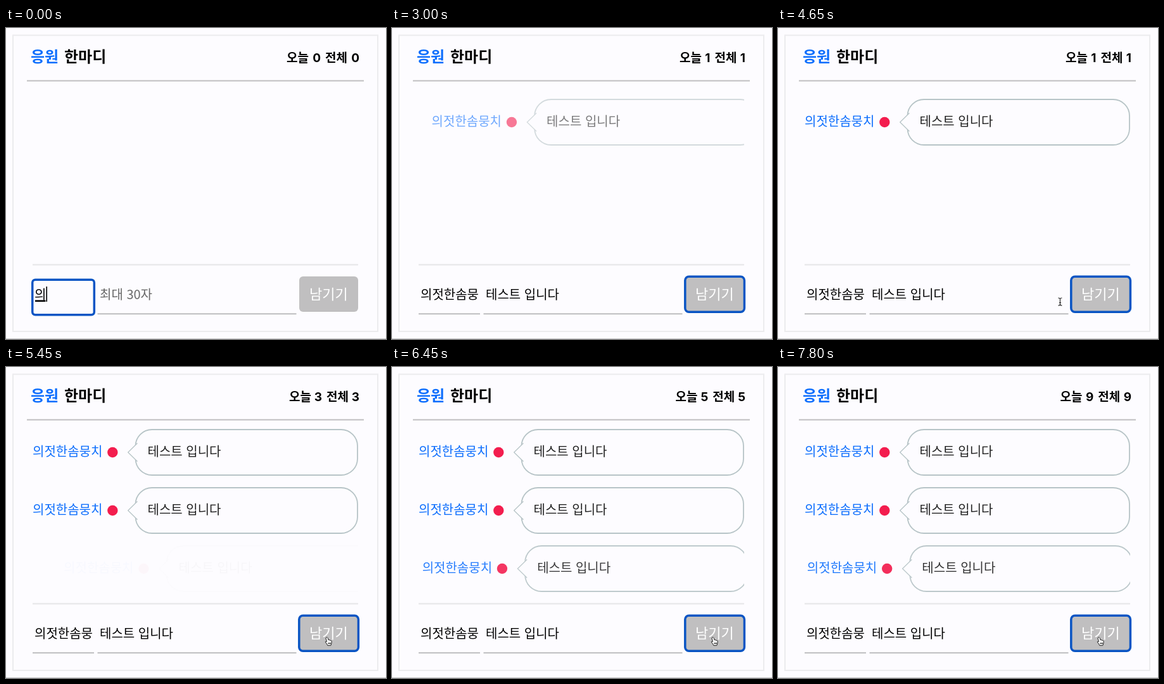
An HTML page for the animation above (7850 ms loop, 600 by 492 pixels).

```html
<!DOCTYPE html>
<html lang="ko">
<head>
<meta charset="utf-8">
<title>응원 한마디</title>
<style>
  html, body { margin: 0; width: 100%; height: 100%; overflow: hidden; background: #fdfcff; }
  svg { display: block; width: 600px; height: 492px; }
  text { font: 400 20px "Noto Sans CJK KR", "Noto Sans KR", "Noto Sans CJK", sans-serif; white-space: pre; }
  .title { font-size: 24px; font-weight: 700; }
  .count { font-size: 19px; font-weight: 700; }
  .digit { font: 700 19px Inter, sans-serif; text-anchor: end; }
  .label { font-size: 22px; fill: #fff; }
  .line { stroke-width: 2; fill: none; }
  .ring { fill: none; stroke: #0a55c4; stroke-width: 3.5; }
</style>
</head>
<body>
<svg viewBox="0 0 600 492">
  <defs>
    <clipPath id="listClip"><rect x="42" y="85" width="514" height="289"/></clipPath>
    <clipPath id="nameClip"><rect x="45" y="400" width="92" height="50"/></clipPath>
    <g id="row">
      <text x="42" y="43" fill="#0d6efd">의젓한솜뭉치</text>
      <circle cx="168.3" cy="37" r="8.2" fill="#f31d4e"/>
      <rect x="204.5" y="1" width="350.5" height="72" rx="26" fill="#fdfcff" stroke="#b7c4c7" stroke-width="1.8"/>
      <path d="M207.5 22.5L192.7 37L207.5 51.5" fill="#fdfcff" stroke="#b7c4c7" stroke-width="1.3"/>
      <text x="223.5" y="43" fill="#222">테스트 입니다</text>
    </g>
  </defs>
  <rect width="600" height="492" fill="#fdfcff"/>
  <rect class="line" x="11" y="11.5" width="576" height="468.5" stroke="#ececee"/>
  <path class="line" d="M0 491.5H600" stroke="#c9c8cb" style="stroke-width:1"/>
  <path class="line" d="M33 83.5H565" stroke="#bfbfc0"/>
  <path class="line" d="M42 374.5H556" stroke="#e6e6e8"/>
  <text class="title" x="39" y="54" fill="#0d6efd">응원</text>
  <text class="title" x="92" y="54">한마디</text>
  <text class="count" id="today" y="54">오늘</text>
  <text class="digit" id="todayNum" y="54"></text>
  <text class="count" id="total" y="54">전체</text>
  <text class="digit" id="totalNum" x="558" y="54"></text>

  <g id="list" clip-path="url(#listClip)"></g>

  <path class="line" id="nameLine" d="M42 452.3H139" stroke="#bdbdbf"/>
  <path class="line" id="msgLine" d="M144.5 452.3H458.5" stroke="#bdbdbf"/>
  <text id="hint" x="148" y="428.5" fill="#686868">최대 30자</text>
  <g clip-path="url(#nameClip)"><text id="name" y="428.5"></text></g>
  <text id="msg" x="148" y="428.5"></text>
  <rect id="compose" y="430.5" height="2.6"/>
  <rect id="caret" y="409" width="1.6" height="24"/>
  <rect x="463" y="393" width="93" height="56" rx="6" fill="#c0bfc0"/>
  <text class="label" x="479" y="428.5">남기기</text>
  <rect class="ring" id="nameRing" x="41.7" y="398.2" width="97.6" height="55.6" rx="4.5"/>
  <rect class="ring" id="msgRing" x="144.2" y="397.2" width="314.6" height="56.2" rx="4.5"/>
  <rect class="ring" id="btnRing" x="462.8" y="393.2" width="93.6" height="56" rx="6"/>

  <g id="arrow" fill="#111" stroke="#fff" stroke-width="1"><path d="M0 0V14L3.3 11L5.5 16L7.8 15L5.6 10.2H10Z"/></g>
  <path id="beam" d="M-3 -6Q0 -6 0 -4Q0 -6 3 -6M0 -4V4M-3 6Q0 6 0 4Q0 6 3 6M-1.5 1.5H1.5" fill="none" stroke="#222" stroke-width="1.1"/>
  <path id="hand" d="M-3 -6.3Q-1.7 -7 -1 -5.5L0 -2.2Q1.2 -3 2 -1.8Q3.2 -2.4 3.8 -1.1Q5.3 -1.5 5.2 .4L4.8 3.5L3.8 6.6H-1.2L-2.5 4L-4.8 .9Q-4.3 -.7 -2.5 .5L-4 -5Q-4 -6 -3 -6.3ZM0 2V4.5M1.7 2V4.5M3.3 2V4.5" fill="#fff" stroke="#222" stroke-width="1"/>
</svg>
<script>
const LOOP = 7850, NAME_END = 1300, SUBMIT_FOCUS = 2700;
const POSTS = [2865, 5050, 5438, 5830, 6210, 6540, 6870, 7200, 7536];
const SLIDE = 400, SHIFT = 50, PITCH = 92;
const NAME_KEYS = '의,읮,의저,의젓,의젓ㅎ,의젓하,의젓한,의젓한ㅅ,의젓한소,의젓한솜,의젓한솜ㅁ,의젓한솜무,의젓한솜뭉,의젓한솜뭉ㅊ,의젓한솜뭉치'.split(',');
const MSG_KEYS = ',ㅌ,테,텟,테스,테슽,테스트,테스트 ,테스트 ㅇ,테스트 이,테스트 입,테스트 입ㄴ,테스트 입니,테스트 입닏,테스트 입니다'.split(',');
const DIGIT_W = [12, 6.5, 10.2, 10, 10.8, 9.7, 10.6, 9.4, 10.4, 10.7];
// time, x, y
const PATH = [[4400, -4, 330], [4500, 150, 372], [4650, 445, 433], [4800, 509, 434]];

const $ = id => document.getElementById(id);
const show = (id, on) => $(id).setAttribute('visibility', on ? 'visible' : 'hidden');
const attr = (id, key, val) => $(id).setAttribute(key, val);
const clamp = (v, lo, hi) => Math.min(hi, Math.max(lo, v));
const typed = (keys, t, start, step) => keys[clamp(Math.floor((t - start) / step), 0, keys.length - 1)];

// The CSS "ease" curve, solved by bisection.
function ease(p) {
  if (p <= 0 || p >= 1) return clamp(p, 0, 1);
  const curve = (s, a, b) => 3 * (1 - s) ** 2 * s * a + 3 * (1 - s) * s * s * b + s ** 3;
  let lo = 0, hi = 1;
  for (let i = 0; i < 20; i++) {
    const mid = (lo + hi) / 2;
    if (curve(mid, .25, .25) < p) lo = mid; else hi = mid;
  }
  return curve(lo, .1, 1);
}

const rows = POSTS.map(() => {
  const use = document.createElementNS('http://www.w3.org/2000/svg', 'use');
  use.setAttribute('href', '#row');
  return $('list').appendChild(use);
});

function drawCount(n) {
  const w = DIGIT_W[n], x = 517 - w;
  attr('total', 'x', x - 1);
  attr('todayNum', 'x', x - 8);
  attr('today', 'x', x - 50 - w);
  $('todayNum').textContent = $('totalNum').textContent = n;
}

function drawList(t) {
  const n = POSTS.filter(p => t >= p).length;
  const scroll = Math.max(0, PITCH * n - 262);
  rows.forEach((row, i) => {
    const e = ease((t - POSTS[i]) / SLIDE);
    row.setAttribute('transform', `translate(${SHIFT * (1 - e)} ${112 + PITCH * i - scroll})`);
    row.setAttribute('opacity', e);
  });
  drawCount(n);
}

function drawForm(t) {
  const onName = t < NAME_END, onBtn = t >= SUBMIT_FOCUS, onMsg = !onName && !onBtn;
  const name = typed(NAME_KEYS, t, 0, 75);
  const msg = typed(MSG_KEYS, t, 1850, 50);
  $('name').textContent = name;
  $('msg').textContent = msg;
  show('nameRing', onName);
  show('msgRing', onMsg);
  show('btnRing', onBtn);
  show('nameLine', !onName);
  show('msgLine', !onMsg);
  show('hint', !msg);
  const nameW = $('name').getComputedTextLength();
  const nameX = onName ? 45 - Math.max(0, nameW - 91) : 45;
  attr('name', 'x', nameX);
  const end = onName ? nameX + nameW : 148 + (msg ? $('msg').getComputedTextLength() : 0);
  const text = onName ? name : msg;
  attr('caret', 'x', end);
  attr('compose', 'x', end - 17.4);
  attr('compose', 'width', 16.4);
  show('caret', !onBtn);
  show('compose', !onBtn && text && !text.endsWith(' '));
}

function drawPointer(t) {
  const i = PATH.findLastIndex(p => t >= p[0]);
  const [t0, x0, y0] = PATH[Math.max(i, 0)];
  const [t1, x1, y1] = PATH[Math.min(i + 1, PATH.length - 1)];
  const k = t1 > t0 ? (t - t0) / (t1 - t0) : 0;
  const x = x0 + (x1 - x0) * k, y = y0 + (y1 - y0) * k;
  const overBtn = x > 463, overInput = !overBtn && y > 397;
  const kind = i < 0 ? '' : overBtn ? 'hand' : overInput ? 'beam' : 'arrow';
  for (const id of ['arrow', 'beam', 'hand']) {
    show(id, id === kind);
    attr(id, 'transform', `translate(${x} ${y})`);
  }
}

const begin = performance.now();
function frame() {
  const t = (performance.now() - begin) % LOOP;
  drawList(t);
  drawForm(t);
  drawPointer(t);
  requestAnimationFrame(frame);
}
frame();
</script>
</body>
</html>
```
